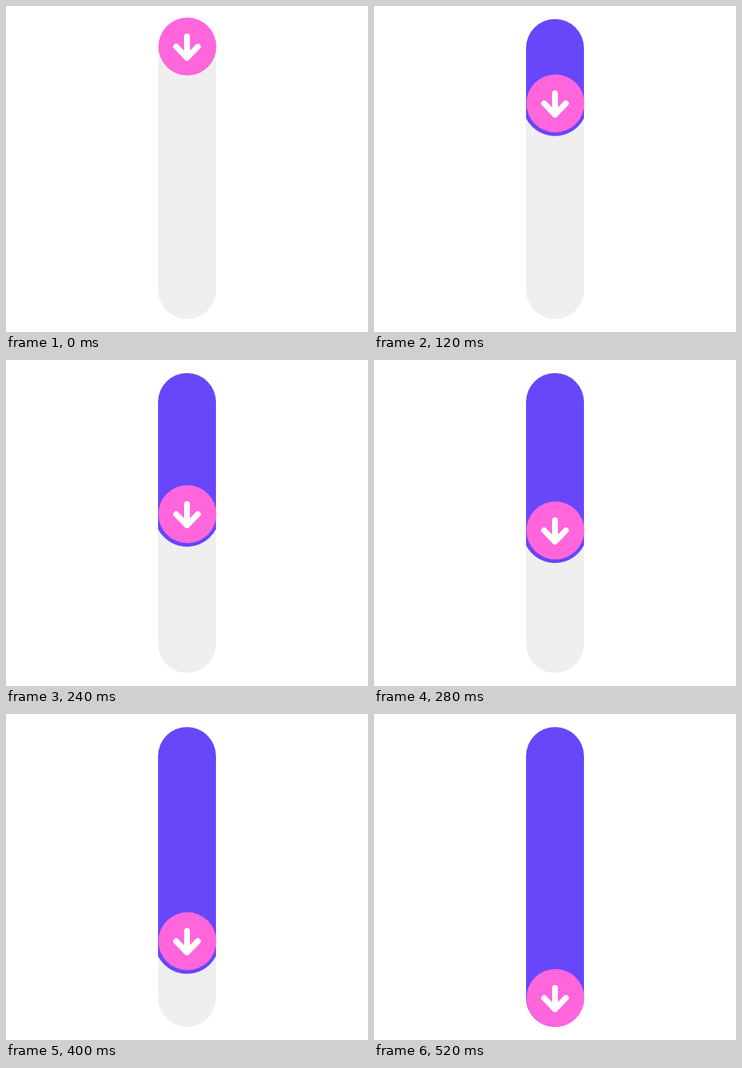
Write an HTML page that moves like this. It is 500x450 px and loops after 3000 ms.

```html
<!DOCTYPE html>
<html>
<head>
<meta charset="utf-8">
<style>
  html, body { margin: 0; height: 100%; overflow: hidden; background: #fff; }
  svg { display: block; }
</style>
</head>
<body>
<svg width="500" height="450" viewBox="0 0 500 450">
  <clipPath id="track"><rect x="210" y="18" width="80" height="414" rx="40"/></clipPath>
  <g clip-path="url(#track)">
    <rect x="210" y="18" width="80" height="414" fill="#efefef"/>
    <g id="fill" fill="#6846fa">
      <rect x="210" y="-400" width="80" height="400"/>
      <circle cx="250" r="45"/>
    </g>
  </g>
  <g id="knob">
    <circle cx="250.5" r="40" fill="#ff66dc"/>
    <path d="M250 -14V15.5M235 0L250 15.5L265 0" fill="none" stroke="#fff"
      stroke-width="8" stroke-linecap="round" stroke-linejoin="round"/>
  </g>
</svg>
<script>
  const LOOP = 3000, STEP = 40, TICKS = 30, TOP = 56, TRAVEL = 336;
  const fill = document.getElementById('fill');
  const knob = document.getElementById('knob');
  const start = performance.now();

  function draw(time) {
    const step = Math.floor(time / STEP);
    // Linear slide counted in whole 60 Hz ticks, shown at 25 fps.
    const tick = Math.min(TICKS, Math.max(0, Math.floor(step * 2.4 - 0.1)));
    const move = `translate(0 ${TOP + TRAVEL * tick / TICKS})`;
    knob.setAttribute('transform', move);
    fill.setAttribute('transform', move);
    fill.setAttribute('visibility', tick ? 'visible' : 'hidden');
  }

  function loop() {
    draw((performance.now() - start) % LOOP);
    requestAnimationFrame(loop);
  }
  loop();
</script>
</body>
</html>
```
